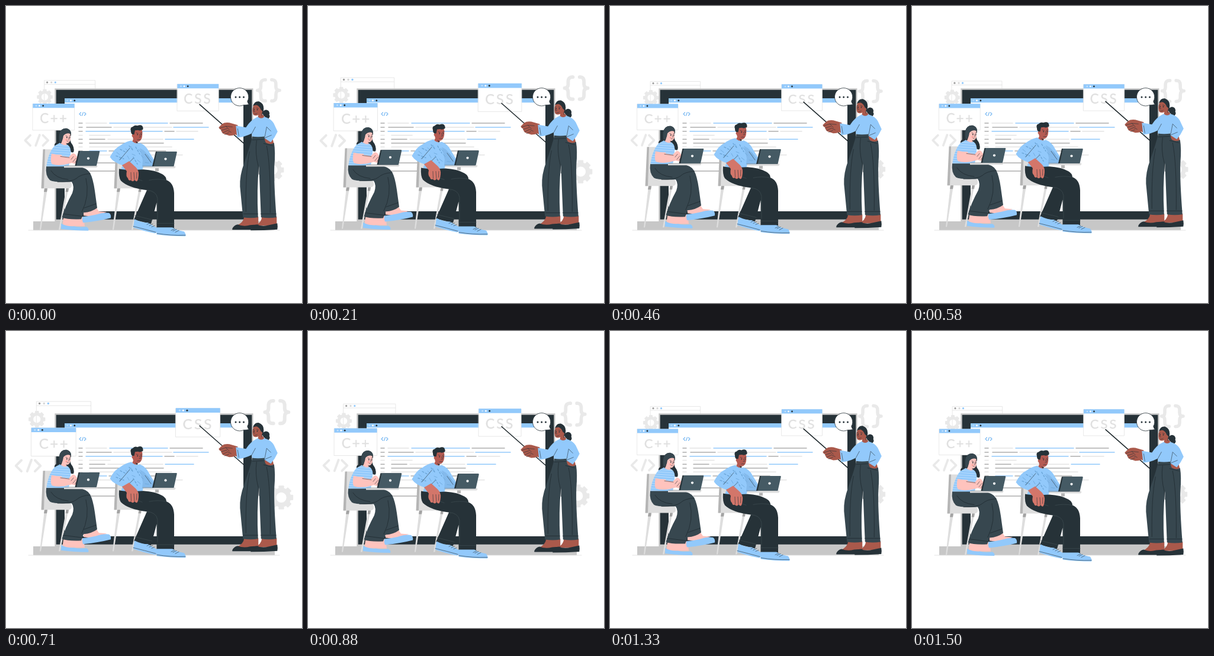
Animation, 500 px wide and 502 px high, one loop 1540 ms. Source, as an HTML page:

```html
<!DOCTYPE html>
<html lang="en">
<head>
<meta charset="utf-8">
<title>Coding class</title>
<style>
html, body { margin: 0; width: 100%; height: 100%; overflow: hidden; background: #fff; }
svg { display: block; width: 100%; height: 100%; }
path, line { stroke-linecap: round; stroke-linejoin: round; }
.zoom { transform: scale(var(--s)); }
.float { transform: translateY(var(--y)); }
.blue { fill: #92c9fb; }
.dark { fill: #263238; }
.slate { fill: #37474f; }
.lid { fill: #455a64; }
.pale { fill: #dedede; }
.mid { fill: #b5b5b5; }
.pink { fill: #ffc3bd; }
.tan { fill: #d3766a; }
.tanDark { fill: #b55b52; }
.brown { fill: #aa594b; }
.line { fill: none; stroke: #263238; stroke-width: .6; }
.soft { fill: none; stroke: #e9e9e9; }
.seam { fill: none; stroke: #1d282d; stroke-width: .7; }
.fold { fill: none; stroke: #6ba6d8; stroke-width: .8; }
.card { fill: #fff; stroke: #e3e3e3; stroke-width: .8; }
text { font: 22px Lato, "Open Sans", sans-serif; fill: #e0e0e0; stroke: #e0e0e0; stroke-width: .4; }
</style>
</head>
<body>
<svg viewBox="0 0 500 502" preserveAspectRatio="none">
  <defs>
    <pattern id="stripes" width="8" height="4" patternUnits="userSpaceOnUse" patternTransform="rotate(4)">
      <path class="blue" d="M0 0H8V4H0z"/>
      <path d="M0 .5H8" stroke="#d3e9fd" stroke-width=".6"/>
    </pattern>
    <g id="laptop">
      <path class="dark" d="M5 0H40L34.500 25H-1z"/>
      <path class="lid" d="M7 0H40Q41 0 40.700 1.500L35.700 24Q35.300 25 34 25H1.500z"/>
      <circle cx="21.500" cy="12.500" r="2.100" fill="#fff"/>
    </g>
    <g id="chair">
      <path class="pale" d="M65 242H81L79 296H106Q112 297 111 304Q110 308 105 308H60z"/>
      <path class="mid" d="M62.500 242H66L64 308H59.500z"/>
      <path class="pale" d="M65 308H70L59 378H57zM102 306H106L91.500 378H89z"/>
      <path fill="#a3a3a3" d="M65 308H70L69 314H64zM101.500 308H106L105 314H100.500z"/>
    </g>
  </defs>

  <g class="zoom" style="transform-origin: 250px 218px">
    <path class="card" d="M68.500 127.500H152.500V174H68.500zM68.500 134H152.500"/>
    <circle cx="73" cy="130.700" r="1.600" fill="#9e9e9e"/>
    <circle cx="80" cy="130.700" r="1.600" fill="#d6d6d6"/>
    <circle class="blue" cx="86.500" cy="130.700" r="1.600"/>
    <g id="gears"></g>
    <path class="soft" stroke-width="3.700" d="M45 218.500L36.500 227L45 235.500M60.500 218L54 235.500M66 218.500L74.500 227L66 235.500"/>
    <path class="soft" stroke-width="5.500" d="M434.500 126.500Q427 126 427 134V138Q427 144 421.500 144Q427 144 427 151V155Q427 162 434.500 161.500M445 126.500Q452 126 452 134V138Q452 144 458 144Q452 144 452 151V155Q452 162 445 161.500"/>
  </g>

  <path d="M38 379H462" stroke="#dedede" stroke-width=".8"/>
  <path fill="#c7c7c7" d="M82.300 139.200H417.500V364H454V378.700H46V364H82.300z"/>
  <path class="dark" d="M84.700 141.800H415.300V360.700H84.700z"/>
  <path fill="#fff" d="M99 156H401V347H99z"/>
  <path class="blue" d="M99 156H401V163.300H99z"/>
  <circle cx="109.500" cy="159.700" r="1.500" fill="#fff"/>
  <circle class="dark" cx="115.800" cy="159.700" r="1.500"/>
  <circle cx="103.500" cy="159.700" r="1.300" fill="#b9dcfc"/>
  <path fill="none" stroke="#76b7f2" stroke-width="1.200" d="M126.500 180L124 182.500L126.500 185M130.500 179.800L128.500 185.200M132.500 180L135 182.500L132.500 185"/>
  <g id="code"></g>

  <g class="zoom" style="transform-origin: 80.500px 187.500px">
    <path class="card" d="M46 166H115V209.500H46z"/>
    <path class="blue" d="M46 165.500H115V172.500H46z"/>
    <circle cx="51.500" cy="169" r="1.300" fill="#c4e1fc"/>
    <circle cx="57" cy="169" r="1.400" fill="#fff"/>
    <circle class="dark" cx="63" cy="169" r="1.400"/>
    <text x="57.800" y="198" letter-spacing="2.300">C++</text>
  </g>
  <g class="zoom" style="transform-origin: 324.500px 154.500px">
    <path class="card" d="M290 133H358.500V177H290z"/>
    <path class="blue" d="M290 132.300H358.500V139.500H290z"/>
    <circle cx="296" cy="136" r="1.300" fill="#c4e1fc"/>
    <circle cx="301.500" cy="136" r="1.400" fill="#fff"/>
    <circle class="dark" cx="307.500" cy="136" r="1.400"/>
    <text x="300.800" y="165" letter-spacing="3">CSS</text>
  </g>

  <path fill="#fff" stroke="#263238" stroke-width=".8" d="M408 161A15.200 15.200 0 1 0 401.500 167.300Q405.500 167.500 410.500 166.500Q408 164.500 408 161z"/>
  <g class="dark"><circle cx="388" cy="154" r="1.500"/><circle cx="394.700" cy="154" r="1.500"/><circle cx="401.500" cy="154" r="1.500"/></g>

  <g class="float">
    <!-- girl -->
    <use href="#chair"/>
    <path class="dark" d="M90 217Q92 206 102 206.500Q110 208 110 217Q107 225 110 231Q116 238 114 247Q109 248 107 243L98 232L88 236Q79 238 83 232Q90 228 90 217z"/>
    <path class="pink" d="M96 217Q103 211 108.500 216Q110.500 229 105 231.500Q102 232.500 101 231L104 236Q98 239 92 233Q96 229 96 217z"/>
    <path class="slate" d="M90 217Q92 206 102 206.500Q110 208 110 216Q102 213 97 219Q96 228 91 231Q89 226 90 217z"/>
    <path class="line" d="M101 219L103.500 220M107 219.500L109 218.800M105.500 221.500L107 224.500L105 225M103 228Q105 228.800 106 227.500"/>
    <path class="dark" d="M102 221h1.500v2h-1.500zM107.200 221h1.300v2h-1.300z"/>
    <circle cx="102" cy="226" r="1.400" fill="#ff9f98"/>
    <path fill="url(#stripes)" d="M91 231Q98 237 104 234Q111 240 109 250L106 273H68Q71 248 82 236z"/>
    <path class="dark" d="M106 232Q111 236 111 246Q116 249 114 240Q112 233 107 229z"/>
    <path class="pink" d="M77 249Q74 264 78 267Q90 271 111 265L119 267L121 257Q117 247 112 249L106 255L94 253V248z"/>
    <path class="line" d="M92 254L107 256M110 259L114 254M113 263L118 257M117 264L119.500 260"/>
    <path fill="url(#stripes)" d="M80 239Q88 236 96 251Q88 252 76 249z"/>
    <path class="pink" d="M97 358L131 356L133 372H104Q95 372 96 366zM131 348L153 341L157 347L170 348L150 356L131 354z"/>
    <path class="blue" d="M93 367.500Q104 373 115 372Q121 374 136 373Q141 376 139 379.500Q115 379.500 93 376.500zM129 356Q140 355 151 352.500Q165 348 174 349.500Q178 352 177 358Q158 363 130 366Q128 361 129 356z"/>
    <path class="slate" d="M68 271Q66 286 74 294Q80 298 111 297Q116 304 112 316Q100 338 94.500 357Q104 361 127 360L131 349Q145 348 154 341L150 312Q147 291 142 282Q137 273 121 271z"/>
    <path class="seam" d="M142 283Q126 284 119 291Q112 297 87 297M135 291Q142 320 128 348M132 341L152 334M96.500 351L128 355M76 278Q84 291 105 293"/>
    <path class="pale" d="M98 270H155L153 273H98z"/>
    <path d="M99 269.800H153" stroke="#858b8e" stroke-width=".8"/>
    <use href="#laptop" x="117.500" y="244.700"/>

    <!-- young man -->
    <use href="#chair" x="123"/>
    <path class="mid" d="M252 273H258V279H252z"/>
    <path class="pale" d="M230 271H287L285 274H230z"/>
    <path class="tanDark" d="M214 210Q222 205 230 210Q231 219 229 224Q226 230 222 229L222 236L211 233L215 225Q212 215 214 210z"/>
    <path class="dark" d="M211 211Q209 205 214 204Q217 200 222 202Q229 199 231 204Q233 209 229 209.500Q226 211 223 209.500L218 210L216.500 217Q215 219 214 217Q211 216 211 211z"/>
    <circle class="tanDark" cx="215" cy="219" r="2.400"/>
    <path class="line" d="M220 214L223 215M227 215L230 213.700M225.500 217L227.500 221L225 221.500M222 225.500Q225 224.500 227 225.500"/>
    <path class="dark" d="M221.500 216h1.300v2h-1.300zM227.700 216h1.200v2h-1.200zM215.500 225.500Q219 230 223 229.300L221.500 232z"/>
    <path class="blue" d="M212 227Q218 234 226 231Q236 235 241 245L252 263L249 271H232L230 278H193L197 269Q181 264 175.500 255Q183 240 194 235Q202 229 212 227z"/>
    <path fill="#84baec" d="M226 240L233 244L251 264L248 271H230L231 261z"/>
    <path class="fold" d="M211 237l3 5M202 241l4 4M187 247l5 4M224 242l4 5M213 250l5 2M239 251l3 6M191 259l5-3M222 260l5 4M228 252l4 4M205 253l3 5M235 264l6 1"/>
    <path class="fold" stroke-dasharray="3 3" style="stroke-width: 1.400" d="M208 236L214 243M219 238L226 250M193 242L203 247M186 253L199 258M215 255L222 267"/>
    <path class="line" d="M192 260L209 240M197 269Q208 266 215 257M235 250L245 264"/>
    <path class="dark" d="M191 275Q204 278 232 276Q252 277 264 284Q271 288 271 294Q283 298 284 316V375H254.500V332L245 368L216 361L238 311Q206 307 194 295Q190 289 191 275z"/>
    <path fill="none" stroke="#3b494f" stroke-width=".8" d="M271 294Q257 291 242 294M238 311Q254 312 256 325V363M218 354L247 361M255 367H284M210 282Q216 291 230 295"/>
    <path class="tan" d="M196 269L208 262L219 272Q225 278 224 286Q223 297 220 296L217 294Q214 298 211 294Q207 296 206 291Q202 288 204 279z"/>
    <path class="line" d="M211 281L211.500 293M216 281L217 294M221 281L220.500 291"/>
    <path class="blue" d="M217 360Q229 366 240 366L255 375Q256 383 252 384Q231 380 215 374zM254.500 374H281Q289 379 301 381Q305 387 303 389Q276 389 254.500 386z"/>
    <path class="line" d="M215 372Q235 377 253 382M255 384Q278 388 303 387M238 369l6-3M242 371l6-3M246 373l5-2M279 379l6-3M282 380l6-3M286 382l6-3"/>
    <path d="M231 270.500H284" stroke="#858b8e" stroke-width=".8"/>
    <use href="#laptop" x="248" y="245.700"/>

    <!-- teacher -->
    <g transform="translate(-.7 0)">
      <path class="line" style="stroke-width: 1.500; stroke: #1b2529" d="M327.700 166L402 231.500"/>
      <path class="brown" d="M403 356H427V372L395 374L390 371Q402 366 403 356zM433 356H458V371H422Q432 366 433 356z"/>
      <path class="dark" d="M383 376Q386 370 392 369Q402 373 413 370L427 369L428 378H383zM414 377Q417 371 423 369Q434 373 445 370L459 367Q460 373 459 377.500Q436 379 414 379z"/>
      <circle class="dark" cx="440" cy="181" r="5.800"/>
      <circle class="dark" cx="442" cy="186" r="4.200"/>
      <path class="dark" d="M418 169Q420 160 428 161Q436 164 436 173L435 182Q430 183 427 176z"/>
      <path class="brown" d="M419 168Q425 163 431 171Q433 174 434 176L433 182L438 188Q433 194 426 188L427 184Q419 187 417.500 181Q416 174 419 168z"/>
      <path class="dark" d="M418 168Q424 160 432 164Q436 169 434.500 178L431 175Q429 169 424 167z"/>
      <path class="line" d="M418 172.500L420 172M424 172L427 173M420 174L419 178L421 178.500M420.500 182Q423 183 425 181M433 181V185"/>
      <path class="dark" d="M419 174h1.200v2h-1.200zM424.500 174h1.400v2h-1.400z"/>
      <path class="brown" d="M435 224L450 219L453 232Q447 237 438 233z"/>
      <path class="slate" d="M417 220H438Q437 228 440 231Q448 235 453.500 231Q456 246 454 270Q453 300 457.500 357Q445 359 431.500 357L428 270Q424 310 426.500 357Q414 359 401 357L396 305Q395 287 403 265Q413 237 417 220z"/>
      <path class="seam" d="M417 226L436 225M424 227Q421 248 427 271L428 284M436 232L452 236M402 351H426M431 351H457M441 236Q448 271 447 349M412 246Q405 279 406 347"/>
      <path class="brown" d="M392 201L378 197Q370 196 366 199L360 205Q361 208 364 209Q365 215 369 216L378 219Q384 219 388 217L392 219z"/>
      <path class="line" d="M362 206L372 203L378 209M364 210L374 207M367 214L375 210L381 213M370 217L377 214M372 203L383 204"/>
      <path class="blue" d="M389 202L406 205Q414 192 426 187Q432 192 437 187Q448 190 453 198L459.500 212Q455 222 448 230L437 223L438 220Q426 222 416 220L416 215Q402 222 391 222z"/>
      <path class="line" d="M416 215L422 204M438 220L441 204L448 211M437 223L449 218M392 207L394 219"/>
    </g>
  </g>
</svg>
<script>
const $ = id => document.getElementById(id);
const shades = { d: '#adadad', l: '#e4e4e4', b: '#92c9fb' };

// Code rows: y, then "shade start end" pieces
const rows = [
  [198, 'd 123 129,l 135 170,b 175 273,d 277 332'],
  [205, 'd 123 129,d 136 178,l 182 280,b 283 342'],
  [211.700, 'd 123 129,b 135 264,d 268 284,l 288 324'],
  [218.500, 'l 123 129,l 141 176'],
  [225.200, 'd 123 129,d 141 167,l 172 265,b 269 317'],
  [231.800, 'd 123 129,d 141 266'],
  [238.300, 'l 123 129,l 141 280'],
  [245, 'd 123 129,b 141 170,d 174 270'],
  [251.700, 'l 123 129,l 141 298'],
  [265.300, 'd 141 190'],
  [279, 'd 141 186']
];
$('code').innerHTML = rows.map(([y, parts]) => parts.split(',').map(part => {
  const [shade, from, to] = part.split(' ');
  return `<line x1="${from}" x2="${to}" y1="${y}" y2="${y}" stroke="${shades[shade]}" stroke-width="1.500"/>`;
}).join('')).join('');

function gear(x, y, r) {
  const teeth = Array.from({ length: 8 }, (_, i) =>
    `<rect x="${-r * .23}" y="${-r}" width="${r * .46}" height="${r * .5}" rx="1" fill="#e9e9e9" transform="rotate(${i * 45})"/>`);
  return `<g transform="translate(${x} ${y})">${teeth.join('')}
    <circle class="soft" r="${r * .62}" stroke-width="${r * .38}"/></g>`;
}
$('gears').innerHTML = gear(69, 155, 13) + gear(446.800, 276, 18.400);

const LOOP = 1540, SPAN = 1500;

// Quick rise, slower fall
const beat = t => Math.max(0, t < 150 ? t / 150 : 1 - (t - 150) / 300);

function draw(now) {
  const t = Math.min(now % LOOP + 28, SPAN);
  const lift = 1 - Math.abs(t / 750 - 1);
  const pulse = beat(t < 600 ? t : t - 600);
  const style = document.documentElement.style;
  style.setProperty('--y', .6 - 6.500 * lift + 'px');
  style.setProperty('--s', 1 + .1 * pulse);
}
const start = performance.now();
(function tick() {
  draw(performance.now() - start);
  requestAnimationFrame(tick);
})();
</script>
</body>
</html>
```
